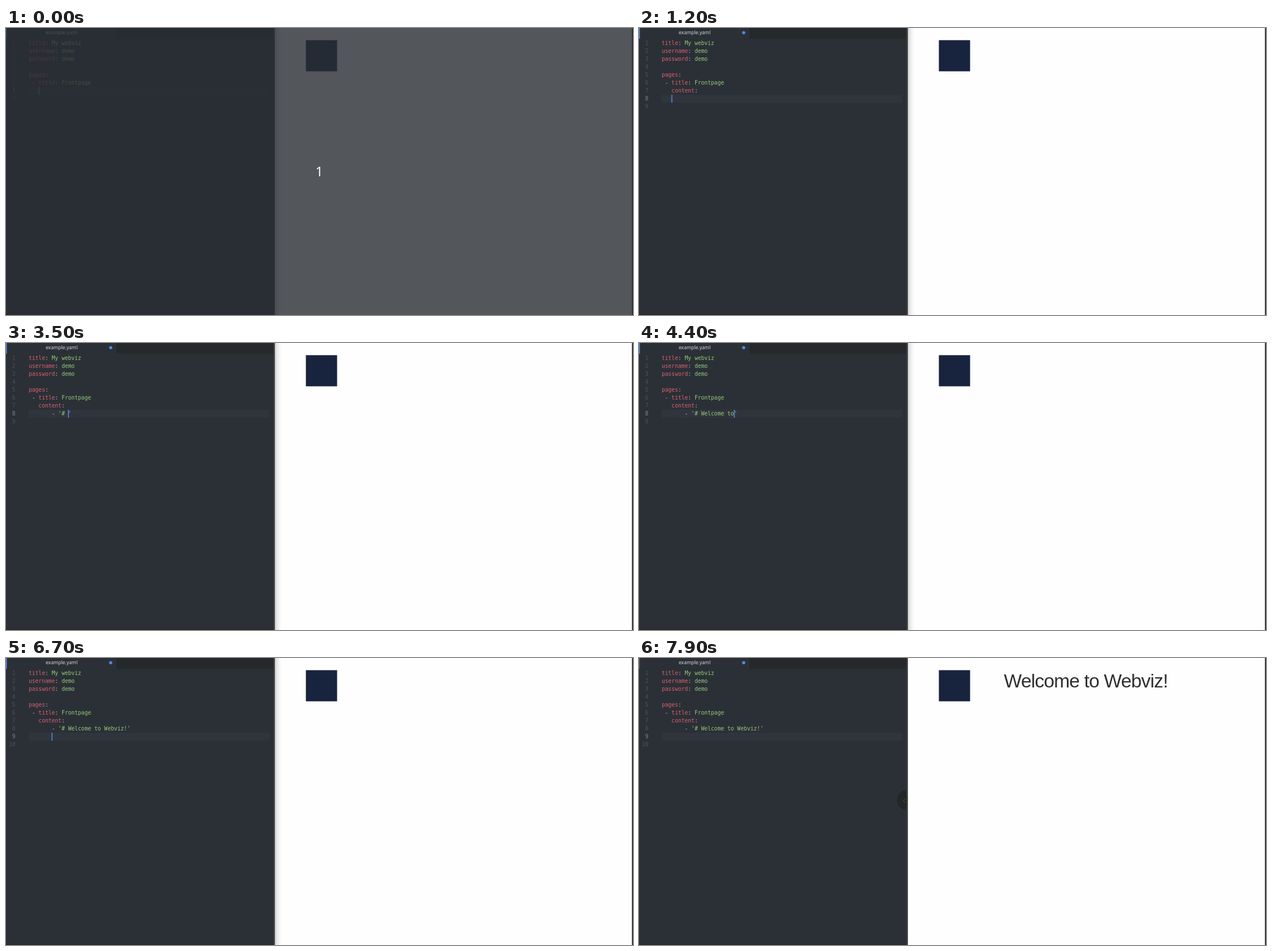
Write an HTML page with a canvas that moves like this. It is 1105 by 507 pixels and loops after 8 s.

```html
<!DOCTYPE html>
<html lang="en">
<head>
<meta charset="utf-8">
<title>Live editing a page</title>
<style>
  html, body { margin: 0; width: 100%; height: 100%; overflow: hidden; }
  canvas { display: block; }
</style>
</head>
<body>
<canvas id="stage" width="1105" height="507"></canvas>
<script>
const ctx = document.getElementById('stage').getContext('2d');
const LOOP = 8000;
const LEFT = 40, CHAR = 5.79, TOP = 20, ROW = 14;
const MONO = '9.62px "DejaVu Sans Mono", monospace';
const GREY = '#abb2bf', RED = '#d95f70', GREEN = '#93c97b', BLUE = '#568af2', EDITOR = '#2b3036';
const SAVED = 5600, RELOADED = 7500;

const opening = `title: My webviz
username: demo
password: demo

pages:
 - title: Frontpage
   `;

// Each burst is typed evenly between its start and end time
const bursts = [
  { start: 300, end: 800, keys: 'content:' },
  { start: 1200, end: 1200, keys: '\n   ' },
  { start: 1400, end: 1700, keys: '    ' },
  { start: 2300, end: 2400, keys: '- ' },
  { start: 3100, end: 3100, keys: "'" },
  { start: 3400, end: 4500, keys: '# Welcome to ' },
  { start: 4800, end: 5400, keys: 'Webviz!' },
  { start: 5900, end: 5900, keys: "'" },
  { start: 6100, end: 6100, keys: '\n       ' }
];

const clamp = x => Math.min(1, Math.max(0, x));

function typed(t) {
  let source = opening, lastKey = -100;
  for (const { start, end, keys } of bursts) {
    if (t < start) break;
    const progress = end > start ? clamp((t - start) / (end - start)) : 1;
    source += keys.slice(0, Math.round(1 + (keys.length - 1) * progress));
    lastKey = Math.min(t, end);
  }
  return { lines: source.split('\n'), idle: t - lastKey };
}

// The caret stays lit while typing, then blinks
const caretLit = idle => idle < 200 || Math.floor((idle - 200) / 400) % 2 === 1;

function rect(color, x, y, w, h) {
  ctx.fillStyle = color;
  ctx.fillRect(x, y, w, h);
}

function disc(color, x, y, r) {
  ctx.fillStyle = color;
  ctx.beginPath();
  ctx.arc(x, y, r, 0, Math.PI * 2);
  ctx.fill();
}

function text(str, x, y, color, font, align = 'left') {
  ctx.font = font;
  ctx.fillStyle = color;
  ctx.textAlign = align;
  ctx.fillText(str, x, y);
}

function codeLine(line, y) {
  const parts = line.match(/^(\s*-? ?)(?:(\w+)(:))?(.*)$/).slice(1);
  const colors = [GREY, RED, GREY, GREEN];
  let col = 0;
  parts.forEach((part = '', i) => {
    text(part, LEFT + col * CHAR, y, colors[i], MONO);
    col += part.length;
  });
}

function tabs(t) {
  rect('#25292b', 195, 0, 277, 19);
  rect('#202426', 195, 0, 1, 19);
  rect(t < RELOADED ? BLUE : '#50565e', 0, 0, 1.5, 19);
  text('example.yaml', 98, 11, '#d2d5da', '8.6px "Noto Sans", sans-serif', 'center');

  const grow = from => clamp((t - from) / 200);
  const unsaved = t < SAVED ? grow(300) : Math.max(1 - grow(SAVED - 100), grow(6200));
  disc('#4c8ae0', 184.5, 8.3, 2.8 * unsaved);
}

function suggestion(line, row) {
  const word = line.match(/\bWe(b|bv|bvi|bviz)?$/);
  if (!word) return;
  const x = LEFT + word.index * CHAR, y = TOP + row * ROW + 1;
  rect('#22262b', x - 5, y, 180, 18);
  rect('#3a404b', x - 4, y + 1, 178, 16);
  text('webviz', x, y + 12, '#d7dae0', MONO);
}

function editor(t) {
  const { lines, idle } = typed(t);
  const row = lines.length, current = lines[row - 1], col = current.length;
  const quoteOpen = current.split("'").length === 2;
  if (quoteOpen) lines[row - 1] += "'";
  lines.push('');

  rect(EDITOR, 0, 0, 472, 507);
  rect('#27292b', 0, 505, 472, 2);
  tabs(t);
  rect('#30353d', LEFT, TOP + (row - 1) * ROW, 424, ROW);
  lines.forEach((line, i) => {
    const y = TOP + i * ROW + 10;
    text(i + 1, 16.5, y, i + 1 === row ? '#7e8590' : '#4b525c', MONO, 'right');
    codeLine(line, y);
  });
  if (caretLit(idle)) rect(BLUE, LEFT + col * CHAR - 0.2, TOP + (row - 1) * ROW, 1.5, ROW);
  suggestion(current, row);
}

function dockToggle(t) {
  ctx.save();
  ctx.globalAlpha = clamp((t - 7000) / 200);
  ctx.beginPath();
  ctx.rect(0, 0, 471, 507);
  ctx.clip();
  disc('#222628', 473, 251, 18);
  ctx.strokeStyle = '#50565e';
  ctx.lineWidth = 1;
  ctx.beginPath();
  ctx.moveTo(469, 248.5);
  ctx.lineTo(466, 252);
  ctx.lineTo(469, 255.5);
  ctx.stroke();
  ctx.restore();
}

function page(t) {
  rect('#fefefe', 474, 0, 629, 507);
  if (t < RELOADED) {
    const shade = ctx.createLinearGradient(474, 0, 486, 0);
    shade.addColorStop(0, 'rgba(0,0,0,.16)');
    shade.addColorStop(0.5, 'rgba(0,0,0,.05)');
    shade.addColorStop(1, 'rgba(0,0,0,0)');
    rect(shade, 474, 0, 12, 507);
  }
  rect('#18233d', 528.5, 21.5, 55, 55);
  if (t >= RELOADED) {
    ctx.letterSpacing = '-0.84px';
    text('Welcome to Webviz!', 643, 52, '#2e2f30', '33.5px "Liberation Sans", Arial, sans-serif');
    ctx.letterSpacing = '0px';
  }
  rect('#303234', 471, 0, 1, 507);
  rect('#484949', 472, 0, 2, 507);
  rect('#3d3d3e', 1103, 0, 2, 507);
}

function countdown() {
  rect('rgba(41,46,52,.8)', 0, 0, 1105, 507);
  text('1', 552, 262, '#fff', '23px "Noto Sans", sans-serif', 'center');
}

function draw(t) {
  editor(t);
  page(t);
  dockToggle(t);
  if (t < 100) countdown();
}

const start = performance.now();
function tick() {
  draw((performance.now() - start) % LOOP);
  requestAnimationFrame(tick);
}
tick();
</script>
</body>
</html>
```
